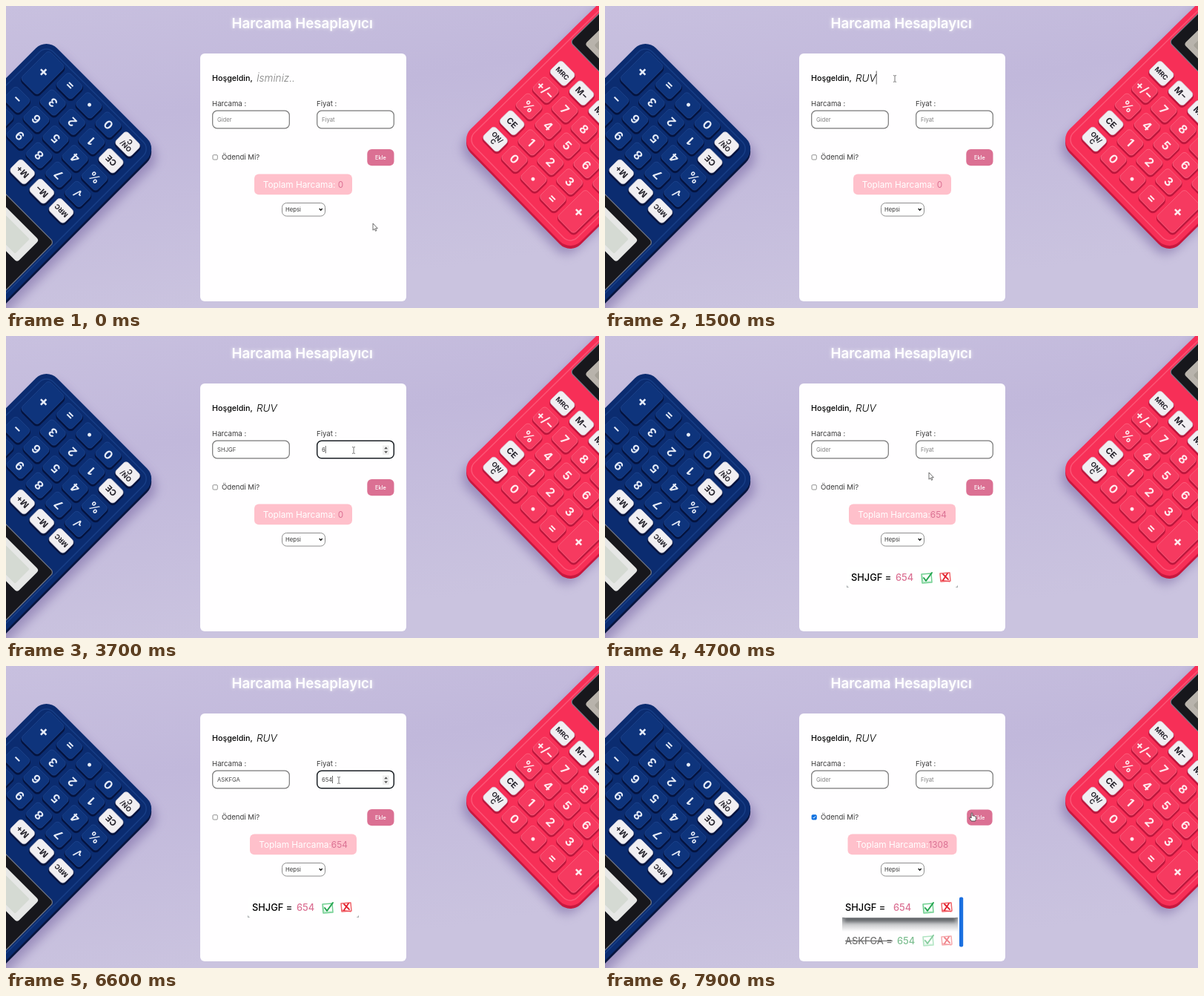
Recreate the animation shown at these times as an HTML page. Size 800 by 407 pixels, loop 8 s.

```html
<!DOCTYPE html>
<html lang="tr">
<head>
<meta charset="utf-8">
<title>Harcama Hesaplayıcı</title>
<style>
  html, body { margin: 0; width: 100%; height: 100%; overflow: hidden; background: #c5bddd; }
  svg { display: block; width: 100vw; height: 100vh; font-family: Inter, "Open Sans", sans-serif; }
  .label { font-size: 9.6px; fill: #3a3a3a; }
  .small { font-size: 7.7px; }
  .field { fill: #fff; }
  .item { font-size: 12.8px; font-weight: 500; }
  .key { text-anchor: middle; font-weight: 700; }
  #title { font-size: 18.7px; font-weight: 600; fill: #fff; text-shadow: 0 0 5px rgba(255,255,255,.75); }
  #total { font-size: 11.8px; fill: #fff; text-anchor: middle; }
</style>
</head>
<body>
<svg viewBox="0 0 800 407" preserveAspectRatio="none">
  <defs>
    <linearGradient id="wall" x2=".3" y2="1">
      <stop stop-color="#c8c0df"/><stop offset=".4" stop-color="#c1b8db"/><stop offset="1" stop-color="#cac3df"/>
    </linearGradient>
    <linearGradient id="fade" x2="0" y2="1">
      <stop stop-color="#4e5357" stop-opacity=".85"/><stop offset="1" stop-color="#4e5357" stop-opacity="0"/>
    </linearGradient>
    <filter id="blur" x="-20%" y="-20%" width="140%" height="140%"><feGaussianBlur stdDeviation="7"/></filter>
    <filter id="soft" x="-20%" y="-60%" width="140%" height="220%"><feGaussianBlur stdDeviation="2"/></filter>
    <clipPath id="listClip"><rect id="listBox" x="319" y="311" width="158" height="67"/></clipPath>
    <g id="tick" fill="none" stroke-linecap="round" stroke-linejoin="round">
      <path d="M-7-5 6-6 7 6-6 7Z" stroke="#6fcf8f" stroke-width="1.5"/>
      <path d="M-6-3-5 5 6 5" stroke="#8adba4" stroke-width=".8"/>
      <path d="M-4 0-1 4 7-7" stroke="#25a550" stroke-width="2"/>
    </g>
    <g id="cross" fill="none" stroke-linecap="round" stroke-linejoin="round">
      <path d="M-7-5 6-6 7 5-6 6Z" stroke="#f0656b" stroke-width="1.5"/>
      <path d="M-6 4 6 6" stroke="#ef3c46" stroke-width="1.2"/>
      <path d="M-3-4 4 3M3-5-3 4" stroke="#e3222e" stroke-width="1.8"/>
    </g>
  </defs>

  <rect width="800" height="407" fill="url(#wall)"/>
  <g id="desk"></g>

  <text id="title" x="304.5" y="29.5">Harcama Hesaplayıcı</text>
  <rect x="262" y="64" width="278" height="334" rx="6" fill="#fffeff"/>

  <text x="278" y="100.5" font-size="10.7" font-weight="500">Hoşgeldin,</text>
  <text id="name" x="338" y="101.5" font-size="13.6" font-style="italic" font-weight="300"></text>

  <text class="label" x="278" y="134.5">Harcama :</text>
  <text class="label" x="419" y="134.5">Fiyat :</text>
  <rect id="costBox" class="field" x="278.7" y="141.2" width="103.6" height="23.6" rx="6"/>
  <rect id="priceBox" class="field" x="419.7" y="141.2" width="103.6" height="23.6" rx="6"/>
  <text id="cost" class="small" x="285" y="155.6"></text>
  <text id="price" class="small" x="426" y="155.6"></text>
  <g id="spin">
    <rect x="508" y="147.5" width="9" height="12.5" fill="#efefef"/>
    <path d="M510.2 152.2 512.6 149.4 515 152.2ZM510.2 155.3 512.6 158.1 515 155.3Z" fill="#505050"/>
  </g>
  <rect id="caret" width=".7" fill="#222"/>

  <rect id="box" x="279" y="200.7" width="6.3" height="6.3" rx="1.2" stroke-width=".8"/>
  <path id="mark" d="M280.5 203.9 281.7 205.2 284 202.3" fill="none" stroke="#fff" stroke-width="1"/>
  <text class="label" x="291" y="207.3">Ödendi Mi?</text>
  <g id="button">
    <rect x="487.3" y="193" width="36.2" height="22.2" rx="6" fill="#db7093"/>
    <text x="505.4" y="206.7" font-size="7.3" font-weight="500" fill="#fff" text-anchor="middle">Ekle</text>
  </g>

  <rect id="totalBox" y="226.5" height="27.7" rx="6" fill="#ffc0cb"/>
  <text id="total" x="401" y="244.5" xml:space="preserve"><tspan id="totalText"></tspan><tspan id="sum" fill="#db7093"></tspan></text>

  <rect x="372.5" y="265.5" width="58" height="17.6" rx="6" fill="#fff" stroke="#808080" stroke-width=".9"/>
  <text class="small" x="377" y="277" fill="#333">Hepsi</text>
  <path d="M422.7 273 424.7 275.2 426.7 273" fill="none" stroke="#111" stroke-width="1.3"/>

  <g id="list" clip-path="url(#listClip)">
    <g id="shade">
      <rect x="323" y="333" width="150" height="12" fill="#3c4144" opacity=".65" filter="url(#soft)"/>
      <rect x="320" y="339" width="156" height="19" fill="url(#fade)" opacity=".7"/>
    </g>
    <g id="corner" fill="#a9adb0"><path d="M326 335v4h4zM476 335v4h-4z"/></g>
    <rect id="row" y="310" height="29.3" rx="5" fill="#fff"/>
    <g id="first" class="item">
      <text x="332" y="330">SHJGF =</text>
      <text x="392" y="330" fill="#db7093">654</text>
      <use href="#tick" x="434" y="326"/>
      <use href="#cross" x="459" y="325"/>
    </g>
    <g id="second" class="item" opacity=".55">
      <text x="324" y="374.5" text-decoration="line-through">ASKFGA =</text>
      <text x="394" y="374.5" fill="#128a36">654</text>
      <use href="#tick" x="436" y="370"/>
      <use href="#cross" x="461" y="370"/>
    </g>
  </g>
  <rect id="bar" x="478" y="311.5" width="5.2" height="67" rx="2" fill="#1b6fe0"/>

  <g id="cursor">
    <path id="arrow" d="M0 0V9.2L2.1 7.3 3.5 10.3 4.9 9.7 3.5 6.7H6.3Z" fill="#fff" stroke="#333" stroke-width=".7"/>
    <path id="beam" d="M-2-4.3H-.6L0-3.7.6-4.3H2M0-3.7V3.7M-2 4.3H-.6L0 3.7.6 4.3H2" fill="none" stroke="#555" stroke-width=".8"/>
    <path id="hand" d="M-.9.5Q0-1 .9.5V4Q2 3.3 2.6 4.3 3.7 3.8 4.2 4.8 5.5 4.5 5.5 6V8.5L4.5 11H-.8L-3.3 7Q-3.3 5.3-1.8 6L-.9 7Z" fill="#fff" stroke="#222" stroke-width=".7"/>
  </g>
</svg>
<script>
const NS = "http://www.w3.org/2000/svg";
const $ = id => document.getElementById(id);
const set = (el, attrs) => { for (const k in attrs) el.setAttribute(k, attrs[k]); return el; };
const add = (parent, tag, attrs, text = "") => {
  const el = set(document.createElementNS(NS, tag), attrs);
  el.textContent = text;
  return parent.appendChild(el);
};
const show = (id, on) => { $(id).style.display = on ? "" : "none"; };

// Calculators: local origin is the centre of the zero key.
function calculator(c) {
  const lift = c.flip ? -1.4 : 1.4;
  const place = (dx, dy) => `translate(${c.x + dx} ${c.y + dy}) rotate(${c.turn})`;
  const box = inset => ({ x: -70 + inset, y: -360, width: 212 - 2 * inset, height: c.foot + 360 - inset, rx: 20 - inset });
  add($("desk"), "rect", { ...box(0), transform: place(c.shade, 11), fill: "#7464a0", opacity: .55, filter: "url(#blur)" });
  add($("desk"), "rect", { ...box(0), transform: place(0, 4), fill: c.side });
  const g = add($("desk"), "g", { transform: place(0, 0) });
  add(g, "rect", { ...box(0), fill: c.body });
  add(g, "rect", { ...box(7), fill: "none", stroke: c.edge, "stroke-width": 1.5, opacity: .6 });
  add(g, "rect", { x: -60, y: -330, width: 194, height: 166, rx: 5, fill: "#17171c", stroke: "#777b88", "stroke-width": 1.2 });
  add(g, "rect", { x: -44, y: -218, width: 160, height: 42, rx: 4, fill: c.glass });
  add(g, "rect", { x: -34, y: -212, width: 140, height: 28, rx: 2, fill: c.lcd });

  function key(label, x, y, w, h, white, size) {
    const rect = (grow = 0) => ({ x: x - w / 2 - grow, y: y - h / 2 - grow, width: w + 2 * grow, height: h + 2 * grow, rx: 5 + grow });
    add(g, "rect", { ...rect(1.3), fill: c.dark, transform: `translate(${lift} ${lift})` });
    add(g, "rect", { ...rect(), fill: white ? "#f1eff2" : c.key, stroke: white ? "#d2ced9" : c.edge, "stroke-width": .7 });
    const ink = { class: "key", x, fill: white ? "#25232c" : c.ink, "font-size": size };
    if (label === "ON/C") {
      add(g, "text", { ...ink, y: y - .5 }, "ON/");
      add(g, "text", { ...ink, y: y + 7.5 }, "C");
    } else add(g, "text", { ...ink, y: y + size * .36 }, label);
  }

  const rows = [["ON/C", "0", "•", "="], ["CE", "1", "2", "3"], ["%", "4", "5", "6", "−"],
                [c.root, "7", "8", "9", "×"], ["MRC", "M−", "M+"]];
  rows.forEach((row, r) => row.forEach((label, i) => {
    const white = r === 4 || label === "CE" || label === "ON/C";
    const size = label === "MRC" || label === "ON/C" ? 9 : white ? 11.5 : 16;
    key(label, (i - 1) * 37, -31.7 * r, 29, white ? 23 : 25, white, size);
  }));
  key("+", 112, -13, 32, 54, false, 21);
}

calculator({ x: 138, y: 160, turn: 225, flip: true, foot: 24, shade: 6, root: "√",
  body: "#0b2c70", side: "#06153f", edge: "#214a94", dark: "#04133f", key: "#0e347c", ink: "#e6ecf8", glass: "#e6e7e6", lcd: "#d5dad3" });
calculator({ x: 686, y: 206, turn: 45.6, flip: false, foot: 34, shade: -5, root: "+/−",
  body: "#f72f57", side: "#c9183f", edge: "#ff6f89", dark: "#bd163c", key: "#f63a60", ink: "#ffeaee", glass: "#b9b4ac", lcd: "#a5a197" });

const LOOP = 8000, FIRST = 4300, LAST = 7800, CHECK = 7050;

// Cursor stops: time, x, y
const path = [
  [0, 495, 293], [200, 495, 293], [700, 391, 98], [1700, 391, 98], [2300, 347, 154],
  [3200, 347, 154], [3450, 469, 154], [3950, 469, 154], [4200, 500, 203], [4400, 500, 203],
  [4700, 437, 184], [5100, 347, 154], [6100, 347, 154], [6300, 449, 154], [6650, 449, 154],
  [7000, 282, 203], [7150, 282, 203], [7550, 495, 198], [LOOP, 495, 198]
];
// Typing: field, text, time of first letter, time per letter, time of clearing
const typing = [
  ["name", "RUV", 1000, 200, LOOP], ["cost", "SHJGF", 2800, 90, FIRST], ["price", "654", 3700, 100, FIRST],
  ["cost", "ASKFGA", 5400, 100, LAST], ["price", "654", 6400, 100, LAST]
];
const focusTimes = [[0, ""], [800, "name"], [2400, "cost"], [3500, "price"], [FIRST, ""],
                    [5200, "cost"], [6300, "price"], [7000, ""]];
const hints = { name: "İsminiz..", cost: "Gider", price: "Fiyat" };

function cursorAt(t) {
  const i = Math.max(1, path.findIndex(p => p[0] > t));
  const [t0, x0, y0] = path[i - 1], [t1, x1, y1] = path[i];
  const u = (t - t0) / (t1 - t0), e = u * u * (3 - 2 * u);
  return [x0 + (x1 - x0) * e, y0 + (y1 - y0) * e];
}

function draw(t) {
  const [x, y] = cursorAt(t);
  const over = (l, top, r, b) => x >= l && x <= r && y >= top && y <= b;
  const onPrice = over(419, 141, 524, 165);
  const onButton = over(487, 193, 524, 215);
  const onText = onPrice || over(278, 141, 383, 165) || over(336, 84, 450, 108);
  set($("cursor"), { transform: `translate(${x} ${y})` });
  show("beam", onText);
  show("hand", onButton);
  show("arrow", !onText && !onButton);
  set($("button"), { transform: onButton ? "translate(505.4 204) scale(.95) translate(-505.4 -204)" : "" });

  const [since, focus] = focusTimes.filter(f => f[0] <= t).pop();
  const values = { name: "", cost: "", price: "" };
  let lastKey = since;
  for (const [field, text, start, step, end] of typing) {
    if (t < start || t >= end) continue;
    const n = Math.min(text.length, Math.floor((t - start) / step) + 1);
    values[field] = text.slice(0, n);
    if (field === focus) lastKey = Math.max(lastKey, start + (n - 1) * step);
  }
  for (const field in values) {
    const v = values[field];
    $(field).textContent = v || hints[field];
    set($(field), { fill: v ? (field === "name" ? "#000" : "#444") : "#808080" });
  }
  for (const field of ["cost", "price"]) {
    const on = field === focus;
    set($(field + "Box"), { stroke: on ? "#1a1f24" : "#787878", "stroke-width": on ? 1.5 : 1.2 });
  }
  show("spin", onPrice || focus === "price");

  show("caret", focus && (t - lastKey) % 1000 < 500);
  if (focus) {
    const width = values[focus] ? $(focus).getComputedTextLength() : 0;
    const big = focus === "name";
    set($("caret"), { x: +$(focus).getAttribute("x") + width, y: big ? 87.5 : 148, height: big ? 18 : 10 });
  }

  const checked = t >= CHECK;
  set($("box"), { fill: checked ? "#0b6fe0" : "#fff", stroke: checked ? "#0b6fe0" : "#767676" });
  show("mark", checked);

  const count = (t >= FIRST) + (t >= LAST), two = count === 2;
  const width = [132, 144, 147][count];
  set($("totalBox"), { x: 401 - width / 2, width });
  $("totalText").textContent = count ? "Toplam Harcama:" : "Toplam Harcama: ";
  $("sum").textContent = 654 * count;

  show("list", count);
  for (const id of ["shade", "second", "bar"]) show(id, two);
  show("corner", !two);
  set($("listBox"), { height: two ? 67 : 28.3 });
  set($("row"), two ? { x: 319, width: 158 } : { x: 326, width: 150 });
  const [label, price, tick, cross] = $("first").children;
  set(label, { x: two ? 324 : 332 });
  set(price, { x: two ? 389 : 392 });
  set(tick, { x: two ? 436 : 434 });
  set(cross, { x: two ? 461 : 459 });
}

const begin = performance.now();
function frame() {
  draw((performance.now() - begin) % LOOP);
  requestAnimationFrame(frame);
}
frame();
</script>
</body>
</html>
```
